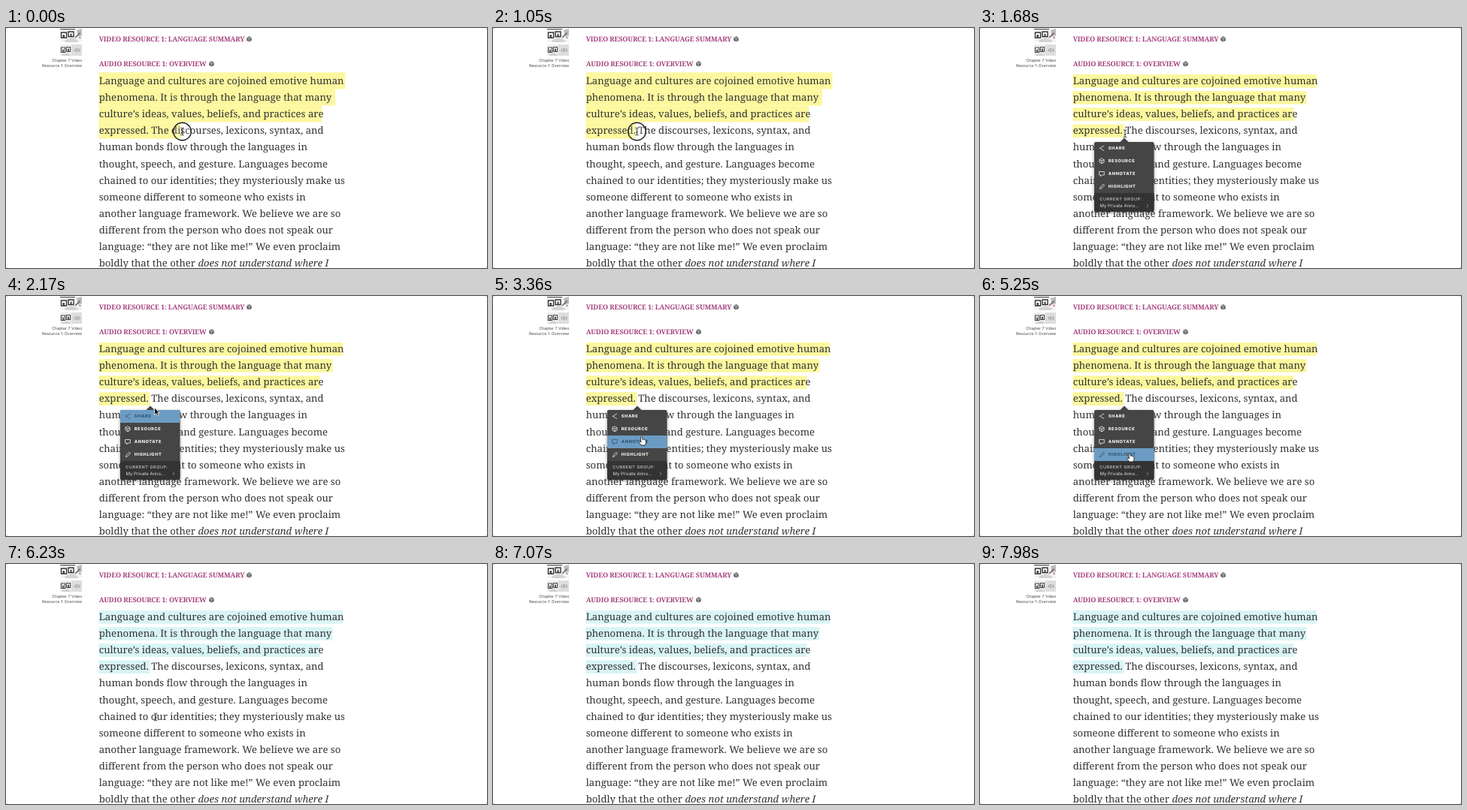
These frames come from a looping animation (640 px wide and 320 px high, 8000 ms). An HTML page:

```html
<!DOCTYPE html>
<html lang="en">
<head>
<meta charset="utf-8">
<title>Highlighting a passage</title>
<style>
html, body { margin: 0; width: 100%; height: 100%; overflow: hidden; background: #c9c9c9; }
svg { display: block; width: 640px; height: 320px; }
text { text-rendering: geometricPrecision; white-space: pre; }
.body { font: 13.15px "Noto Serif", serif; fill: #333; }
.head { font: bold 9.1px "Noto Serif", serif; fill: #a5417f; letter-spacing: -.16px; }
.side { font: 400 5.25px Inter, sans-serif; fill: #444; text-anchor: end; }
.item { font: 800 5.7px Inter, sans-serif; letter-spacing: .55px; }
.group { font: 500 5.5px Inter, sans-serif; fill: #c8c8c8; letter-spacing: .55px; }
.name { font: 400 6px Inter, sans-serif; fill: #ddd; }
.line { fill: none; stroke-width: .8; stroke-linejoin: round; stroke-linecap: round; }
</style>
</head>
<body>
<svg viewBox="0 0 640 320">
  <defs>
    <g id="cube">
      <path d="M0-3.7 3.3-1.9V1.9L0 3.7-3.3 1.9V-1.9Z" fill="#666"/>
      <path d="M-3.2-1.8 0-.1 3.2-1.8M0 0V3.5M-1.6-2.7 1.6-1" fill="none" stroke="#ddd" stroke-width=".6"/>
    </g>
    <filter id="soft" x="-20%" y="-20%" width="140%" height="140%">
      <feDropShadow dx="0" dy="1.5" stdDeviation="2" flood-opacity=".4"/>
    </filter>
  </defs>
  <rect width="640" height="320" rx="3" fill="#fff"/>

  <g id="thumbs">
    <rect x="72" y="1" width="29" height="18" fill="#f4f4f5"/>
    <path d="M72 1H92V2.2H72Z" fill="#555"/>
    <path d="M73.5 6H80.5V13H73.5ZM83 5H90V11.5H83Z" fill="#fff" stroke="#333" stroke-width="1.4"/>
    <path d="M75.5 9H78V13H75.5ZM85.5 7.5H87.5V11H85.5Z" fill="#444"/>
    <path d="M78 16 88 13 97 17 94 19H79Z" fill="#d4d4d8"/>
    <path d="M94 3 101 1V10L96 12Z" fill="#bbbac0"/>
    <path d="M92 13 98.5 6.5" stroke="#555" stroke-width="1.2"/>
    <circle cx="98.5" cy="13" r="1.3" fill="#d98a8a"/>
    <rect x="72" y="22" width="29" height="15" fill="#eeeeef"/>
    <path d="M73.5 26H78.5V32.5H73.5ZM80.5 25.5H85.5V31.5H80.5Z" fill="#fff" stroke="#444" stroke-width="1.2"/>
    <path d="M75 28.5H77V32H75ZM82 27.5H84V31H82Z" fill="#555"/>
    <path d="M74 35.5 81 33.5 86 35.5V37H75Z" fill="#d0d0d4"/>
    <rect x="87" y="22" width="14" height="15" fill="#dedee1"/>
    <path d="M91 28.5H92.5L94.5 27V32L92.5 30.5H91ZM96 28Q97 29.5 96 31M97.5 27Q99 29.5 97.5 32" fill="none" stroke="#888" stroke-width=".7"/>
  </g>
  <text class="side" x="101.3" y="45">Chapter 7 Video</text>
  <text class="side" x="101.3" y="52">Resource 1: Overview</text>

  <text class="head" x="123.7" y="18.2">VIDEO RESOURCE 1: LANGUAGE SUMMARY</text>
  <text class="head" x="123.7" y="51.2">AUDIO RESOURCE 1: OVERVIEW</text>
  <use href="#cube" x="323.5" y="14.8"/>
  <use href="#cube" x="273.5" y="47.8"/>

  <g id="marks"></g>
  <g id="copy"></g>

  <g id="menu">
    <g filter="url(#soft)">
      <path d="M186 152.5 192 146.5 198 152.5Z" fill="#444"/>
      <rect x="152" y="152" width="79.5" height="93" rx="2" fill="#444"/>
    </g>
    <path d="M152 220H231.5V243Q231.5 245 229.5 245H154Q152 245 152 243Z" fill="#333"/>
    <rect id="hover" x="152" width="79.5" height="17" fill="#6c9cc3"/>
    <g id="items"></g>
    <text class="group" x="159.3" y="230.2">CURRENT GROUP:</text>
    <text class="name" x="159.5" y="239.3">My Private Anno...</text>
    <path class="line" d="M222 235 224 237 222 239" stroke="#999"/>
  </g>

  <g id="cursor">
    <circle id="ring" r="11.8" fill="#fff" fill-opacity=".15" stroke="#1a1a1a" stroke-width="1.4"/>
    <path id="beam" d="M-2.2-5Q0-5 0-3.6Q0-5 2.2-5M0-3.8V3.8M-2.2 5Q0 5 0 3.6Q0 5 2.2 5M-1.3 1.2H1.3" fill="none" stroke="#333" stroke-width="1"/>
    <path id="arrow" d="M0 0V9.6L2.2 7.5 3.8 11 5.6 10.2 4.1 6.8H7Z" fill="#111" stroke="#fff" stroke-width=".8"/>
    <path id="hand" d="M-1 .8Q0-.6 1 .8L1.4 4.2Q2.4 3.4 3.1 4.5Q4 3.9 4.6 4.9Q5.8 4.5 6 6V8.6L5 12H-.4L-3.6 7.7Q-3.7 6.3-2.4 6.7L-.7 8Z" fill="#fff" stroke="#222" stroke-width=".9" stroke-linejoin="round"/>
  </g>
</svg>
<script>
const LOOP = 8000, TOP = 75, STEP = 22.1, LEFT = 123.7;
const NS = 'http://www.w3.org/2000/svg';
const $ = id => document.getElementById(id);

function add(parent, tag, attrs, text = '') {
  const el = document.createElementNS(NS, tag);
  for (const key in attrs) el.setAttribute(key, attrs[key]);
  el.textContent = text;
  parent.appendChild(el);
  return el;
}

const lines = [
  'Language and cultures are cojoined emotive human',
  'phenomena. It is through the language that many',
  'culture’s ideas, values, beliefs, and practices are',
  'expressed. The discourses, lexicons, syntax, and',
  'human bonds flow through the languages in',
  'thought, speech, and gesture. Languages become',
  'chained to our identities; they mysteriously make us',
  'someone different to someone who exists in',
  'another language framework. We believe we are so',
  'different from the person who does not speak our',
  'language: “they are not like me!” We even proclaim',
  'boldly that the other '
].map((s, i) => add($('copy'), 'text', { class: 'body', x: LEFT, y: TOP + STEP * i }, s));
add(lines[11], 'tspan', { 'font-style': 'italic' }, 'does not understand where I');

const marks = [0, 1, 2, 3].map(() => add($('marks'), 'rect', { x: 123.5 }));

const icons = [
  'M164 157.5 159.5 160.3 164 163M159 160.3h.1M164.5 157.3h.1M164.5 163.2h.1',
  'M162 174 165 175.7V179L162 180.7 159 179V175.7ZM159 175.7 162 177.4 165 175.7M162 177.4V180.7',
  'M159 191.5H165.3V196H162.2L160.5 198V196H159Z',
  'M159.5 214.3 160.2 212 164 208.2 165.6 209.8 161.8 213.6Z'
];
const items = ['SHARE', 'RESOURCE', 'ANNOTATE', 'HIGHLIGHT'].map((s, i) => [
  add($('items'), 'path', { class: 'line', d: icons[i] }),
  add($('items'), 'text', { class: 'item', x: 170.8, y: 162.4 + 17 * i }, s)
]);

// Pointer path: time, x, y
const path = [
  [0, 234.5, 138], [70, 234, 138], [980, 191.5, 138], [1500, 191.5, 138],
  [2050, 197.5, 149], [2310, 197.5, 149], [2730, 197, 174], [3080, 197, 174],
  [3330, 197.5, 187], [3920, 197.5, 187], [4400, 199, 209], [5560, 199, 209],
  [6000, 199, 204], [7070, 199, 204], [7560, 206, 264], [LOOP, 206, 264]
];
const clamp = v => Math.max(0, Math.min(1, v));
const ramp = (t, a, b) => clamp((t - a) / (b - a));
const ease = k => k * k * (3 - 2 * k);

function pointer(t) {
  const i = path.findIndex((p, n) => n && t <= p[0]);
  const [a, b] = [path[i - 1], path[i]];
  const k = ease(ramp(t, a[0], b[0]));
  return [a[1] + (b[1] - a[1]) * k, a[2] + (b[2] - a[2]) * k];
}

// Nearest letter edge on the fourth line
function letterEdge(x) {
  let best = LEFT;
  for (let i = 0; i < 24; i++) {
    const edge = lines[3].getStartPositionOfChar(i).x;
    if (Math.abs(edge - x) < Math.abs(best - x)) best = edge;
  }
  return best;
}

function show(id, opacity) { $(id).setAttribute('opacity', +opacity); }

function draw(t) {
  const [x, y] = pointer(t);
  const selecting = t < 1500;
  const open = ramp(t, 1500, 1640) * (1 - ramp(t, 5460, 5680));

  const ends = selecting ? [451.5, 438, 420, letterEdge(x)] : [448, 434.5, 417.5, 191.5];
  const color = selecting ? '#fdf89f' : t < 5400 ? '#fcf89e' : '#d9f4f5';
  marks.forEach((m, i) => {
    m.setAttribute('y', (selecting ? 59.2 : 62) + STEP * i);
    m.setAttribute('height', selecting ? STEP + .1 : 17.6);
    m.setAttribute('width', ends[i] - 123.5);
    m.setAttribute('fill', color);
  });

  const over = y > 145;
  const row = Math.max(0, Math.min(3, Math.floor((y - 152) / 17)));
  show('menu', open);
  show('hover', over);
  $('hover').setAttribute('y', 152 + 17 * row);
  items.forEach(([icon, label], i) => {
    const ink = over && i === row ? '#2f5574' : '#f2f2f2';
    icon.setAttribute('stroke', ink);
    label.setAttribute('fill', ink);
  });

  $('cursor').setAttribute('transform', `translate(${x} ${y})`);
  const inMenu = open > .3 && over;
  show('cursor', t < 7700);
  show('ring', t < 1200);
  show('beam', !inMenu);
  show('arrow', inMenu && row === 0);
  show('hand', inMenu && row > 0);
}

const start = performance.now();
function tick() {
  draw((performance.now() - start) % LOOP);
  requestAnimationFrame(tick);
}
draw(0);
requestAnimationFrame(tick);
</script>
</body>
</html>
```
